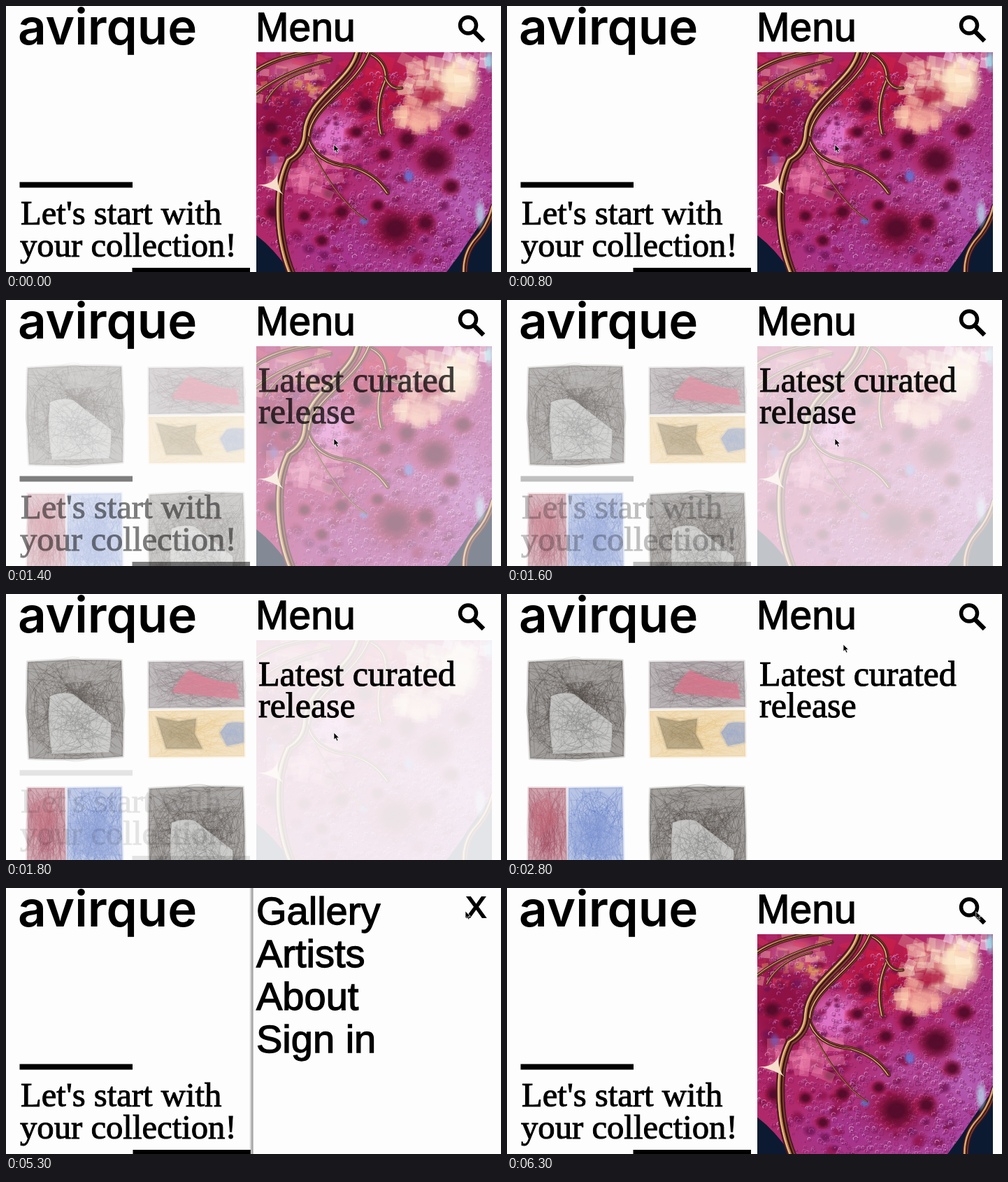
These frames come from a looping animation (708x380 px, 6.5 s). An HTML page with a canvas:

```html
<!DOCTYPE html>
<html lang="en">
<head>
<meta charset="utf-8">
<title>Collection</title>
<style>
  html, body { margin: 0; width: 100%; height: 100%; overflow: hidden; background: #fdfdfd; }
  canvas, svg { position: absolute; left: 0; top: 0; }
  .brand { font: 600 71px Inter, sans-serif; }
  .sans { font: 56px "Liberation Sans", Arial, sans-serif; stroke: #000; stroke-width: 1.3; }
  .serif { font: 48.7px "Liberation Serif", serif; stroke: #000; stroke-width: 1; }
</style>
</head>
<body>
<canvas id="sketches" width="708" height="380"></canvas>
<canvas id="artwork" width="708" height="380"></canvas>
<svg width="708" height="380" viewBox="0 0 708 380">
  <defs>
    <linearGradient id="shade">
      <stop offset="0" stop-color="#777" stop-opacity="0"/>
      <stop offset=".7" stop-color="#777" stop-opacity=".7"/>
      <stop offset="1" stop-color="#ddd"/>
    </linearGradient>
  </defs>
  <text class="brand" x="17" y="55">avirque</text>
  <text class="sans" x="357" y="49.5" style="font-size:57px">Menu</text>
  <g fill="none" stroke="#000">
    <circle cx="661" cy="27.5" r="11.5" stroke-width="5.5"/>
    <path d="M669 36L683 50" stroke-width="6.5"/>
  </g>
  <g id="intro">
    <rect x="19.5" y="251.5" width="161.5" height="8"/>
    <text class="serif" x="21" y="312">Let's start with</text>
    <text class="serif" x="20" y="358">your collection!</text>
    <rect id="lowerBar" x="180.5" y="374" width="168.5" height="6"/>
  </g>
  <g id="release" class="serif" style="font-size:50px">
    <text x="361" y="131">Latest curated</text>
    <text x="361" y="176">release</text>
  </g>
  <g id="menu">
    <rect x="348" width="6" height="380" fill="url(#shade)"/>
    <rect x="354" width="354" height="380" fill="#fdfdfd"/>
    <g class="sans">
      <text x="358" y="51.5">Gallery</text>
      <text x="358" y="112.5">Artists</text>
      <text x="358" y="173.5">About</text>
      <text x="358" y="234.5">Sign in</text>
      <text x="658" y="42" style="font-size:43px;stroke-width:2">X</text>
    </g>
  </g>
  <path id="cursor" d="M0 0V10L2.4 8L4.2 12L6 11.2L4.3 7.4H7.4Z" stroke="#fff" stroke-width=".7"/>
</svg>
<script>
const $ = id => document.getElementById(id);
const TAU = Math.PI * 2, LOOP = 6500;

let seed = 11;
function random() {
  seed = (seed * 1664525 + 1013904223) >>> 0;
  return seed / 4294967296;
}
const between = (a, b) => a + (b - a) * random();
const pick = list => list[Math.floor(random() * list.length)];

// Fill an outline softly, then hatch it with loose looping strokes.
function scribble(c, outline, color, density, wash = .3) {
  const shape = new Path2D(outline);
  const [x0, y0, x1, y1] = outline.match(/\d+/g).map(Number).reduce(
    (box, v, i) => i % 2 ? [box[0], Math.min(box[1], v), box[2], Math.max(box[3], v)]
                         : [Math.min(box[0], v), box[1], Math.max(box[2], v), box[3]],
    [999, 999, 0, 0]);
  c.fillStyle = c.strokeStyle = color;
  c.globalAlpha = wash;
  c.fill(shape);
  c.save();
  c.lineWidth = 4;
  c.lineJoin = "round";
  c.globalAlpha = wash / 3;
  c.stroke(shape);
  c.clip(shape);
  c.lineWidth = .6;
  c.globalAlpha = .42;
  const x = () => between(x0 - 4, x1 + 4), y = () => between(y0 - 4, y1 + 4);
  for (let i = 0; i < density; i++) {
    c.beginPath();
    c.moveTo(x(), y());
    c.bezierCurveTo(x(), y(), x(), y(), x(), y());
    c.stroke();
  }
  c.restore();
  c.globalAlpha = .25;
  c.lineWidth = .6;
  for (let i = 0; i < density / 12; i++) {
    c.beginPath();
    c.ellipse((x0 + x1) / 2 + between(-3, 3), (y0 + y1) / 2 + between(-3, 3),
      (x1 - x0) * between(.4, .5), (y1 - y0) * between(.4, .5), 0, between(0, TAU), between(0, TAU));
    c.stroke();
  }
  c.globalAlpha = 1;
}

function darkSketch(c, dx, dy) {
  const patch = "M63 146Q80 139 96 143L150 185Q151 210 147 226L66 228Q58 185 63 146Z";
  c.save();
  c.translate(dx, dy);
  scribble(c, "M31 97Q98 92 165 95Q169 165 167 232Q100 238 33 235Q28 160 31 97Z", "#49433e", 230, .5);
  c.fillStyle = "#d8d8d6";
  c.globalAlpha = .9;
  c.fill(new Path2D(patch));
  scribble(c, patch, "#777775", 75, .1);
  scribble(c, "M92 104L141 100L148 122L84 127Z", "#aaa7a4", 40, .35);
  c.restore();
}

function drawSketches() {
  const c = $("sketches").getContext("2d");
  darkSketch(c, 0, 0);
  scribble(c, "M204 97L339 96L341 161L204 163Z", "#786c73", 120, .5);
  scribble(c, "M238 140Q248 122 262 109Q290 125 329 128L333 150Z", "#d9778c", 50, .75);
  scribble(c, "M204 167L340 166L341 232L205 233Z", "#e6c07c", 90, .5);
  scribble(c, "M215 176L247 182L272 178L270 200L281 221L229 221Z", "#98896a", 45, .6);
  scribble(c, "M340 184Q325 182 316 185L306 198L316 217L340 212Z", "#9ba9cb", 40, .7);
  scribble(c, "M31 277L84 277L86 400L30 400Z", "#a04c60", 130, .5);
  scribble(c, "M37 300L60 292L72 325L40 350Z", "#c26b7b", 30, .4);
  scribble(c, "M88 277L165 276L167 400L87 400Z", "#5876c2", 140, .42);
  scribble(c, "M95 325L130 312L160 335L158 374L98 370Z", "#92a4d8", 40, .4);
  darkSketch(c, 174, 181);
}

function drawArtwork() {
  const c = $("artwork").getContext("2d");

  function blob(x, y, rx, ry, color, alpha = 1, core = .35) {
    c.save();
    c.translate(x, y);
    c.scale(rx, ry);
    const glow = c.createRadialGradient(0, 0, 0, 0, 0, 1);
    glow.addColorStop(0, color);
    glow.addColorStop(core, color);
    glow.addColorStop(1, color + "00");
    c.globalAlpha = alpha;
    c.fillStyle = glow;
    c.fillRect(-1, -1, 2, 2);
    c.restore();
  }

  function branch(d, width) {
    const path = new Path2D(d);
    c.lineCap = "round";
    [["#4a1628", 1.25, 0], ["#7d4128", .9, 0], ["#c08a50", .35, -.2], ["#f6d9a4", .12, -.3], ["#3a1418", .25, .15]]
      .forEach(([color, scale, shift]) => {
        c.save();
        c.translate(width * shift, 0);
        c.strokeStyle = color;
        c.lineWidth = width * scale;
        c.stroke(path);
        c.restore();
      });
  }

  // Small tilted translucent tiles scattered over an area
  function facets(count, x0, y0, x1, y1, size, colors, alpha) {
    for (let i = 0; i < count; i++) {
      c.save();
      c.translate(between(x0, x1), between(y0, y1));
      c.rotate(between(-.2, .5));
      c.globalAlpha = alpha * between(.4, 1);
      c.fillStyle = pick(colors);
      const w = size * between(.5, 1.3), h = size * between(.4, 1);
      c.fillRect(-w / 2, -h / 2, w, h);
      c.restore();
    }
  }

  c.beginPath();
  c.rect(358, 66, 337, 314);
  c.clip();
  c.fillStyle = "#0c1a31";
  c.fillRect(358, 66, 337, 314);

  c.save();
  c.clip(new Path2D("M340 50H720V260Q690 292 664 332Q645 362 622 390H412Q385 345 350 322Z"));
  const base = c.createLinearGradient(358, 80, 680, 350);
  base.addColorStop(0, "#a81d58");
  base.addColorStop(.45, "#b02a6c");
  base.addColorStop(1, "#a846a4");
  c.fillStyle = base;
  c.fillRect(358, 66, 337, 314);

  blob(395, 175, 60, 85, "#870d3c", .8);
  blob(540, 120, 85, 70, "#b8143e", .9);
  blob(470, 185, 50, 42, "#e47bd0", .9);
  blob(590, 265, 80, 50, "#b54a9c", .7);
  blob(480, 350, 90, 50, "#a4348c", .8);
  blob(560, 320, 65, 50, "#8f1950", .8);
  blob(655, 260, 45, 70, "#b866bc", .7);
  blob(410, 95, 45, 28, "#d97892", .8);
  facets(45, 358, 66, 460, 140, 15, ["#f3b7a4", "#7a1335", "#d8a05c", "#b03a8c", "#e03c58"], .6);
  facets(35, 480, 75, 620, 185, 22, ["#e02444", "#8b0e30", "#d8456a"], .4);

  // Deep pores among fine glassy bubbles
  for (let i = 0; i < 110; i++) {
    const r = between(4, 11);
    blob(between(358, 640), between(110, 380), r * 1.2, r, pick(["#7a0f3c", "#8f1248", "#6d1250"]), .75);
  }
  const tones = ["#ec9fd8", "#d566b8", "#f3c4ea", "#c23d86", "#cf83d6"];
  for (let i = 0; i < 2300; i++) {
    const x = 358 + 337 * Math.pow(random(), .75), y = between(95, 380), r = between(.7, 3.4);
    c.lineWidth = 1.1;
    c.globalAlpha = .4;
    c.strokeStyle = "#741758";
    c.beginPath();
    c.arc(x + .8, y + .8, r, 0, TAU);
    c.stroke();
    c.globalAlpha = between(.25, .7);
    c.strokeStyle = c.fillStyle = pick(tones);
    c.beginPath();
    c.arc(x, y, r, Math.PI * .8, Math.PI * 1.9);
    r < 1.4 ? c.fill() : c.stroke();
  }
  c.globalAlpha = 1;

  [[612, 220, 32], [652, 178, 18], [555, 318, 34], [605, 128, 22], [512, 142, 18], [572, 190, 18],
   [377, 174, 18], [398, 193, 13], [478, 294, 15], [425, 300, 13], [635, 258, 16], [540, 212, 15],
   [500, 180, 13], [460, 268, 12], [598, 310, 18], [530, 285, 13], [380, 295, 16], [450, 335, 13]]
    .forEach(([x, y, r]) => {
      blob(x, y, r * 1.2, r * 1.05, "#ac1444", .7, .4);
      blob(x + 2, y, r * .9, r * .8, "#4d0a28", .9, .35);
    });

  // Glossy reflections
  blob(625, 118, 60, 50, "#eea591", .7, .3);
  blob(648, 105, 34, 42, "#fbe6c2", .9, .5);
  blob(588, 160, 42, 20, "#f6b09c", .8, .5);
  blob(605, 128, 27, 15, "#b01c44", .9, .4);
  facets(40, 570, 78, 668, 145, 20, ["#fbe3c0", "#f6b8a0", "#fff4de"], .5);
  facets(16, 556, 148, 615, 178, 18, ["#f8b4a0", "#fbd6b4"], .5);
  facets(10, 628, 68, 690, 84, 16, ["#fdf3e6", "#f3c8e4"], .7);
  blob(607, 129, 22, 12, "#b01c44", .8, .4);
  facets(18, 380, 212, 475, 272, 27, ["#f58cb4"], .4);
  blob(576, 243, 9, 11, "#5b78d8", .8);
  blob(512, 307, 8, 7, "#507cd0", .7);
  blob(383, 218, 8, 12, "#6b5fc0", .6);
  c.restore();

  blob(691, 78, 8, 20, "#94dce8", .8);
  blob(678, 297, 9, 24, "#b9e4f2", .7);

  branch("M358 92Q390 70 450 64", 6);
  branch("M358 125Q400 92 465 77", 4);
  branch("M436 92Q390 102 372 137", 3);
  branch("M516 66Q545 77 544 105Q527 143 537 182", 5);
  branch("M543 102Q550 120 566 117", 4);
  branch("M442 215Q478 282 515 305", 2);
  branch("M697 286Q690 315 670 336Q655 355 656 382", 7);
  branch("M432 187Q442 225 492 229Q528 239 546 267", 5);
  branch("M504 66C493 110 432 132 429 181Q428 207 405 220Q390 250 391 292Q391 340 408 382", 10);
  branch("M520 66C500 118 437 142 434 185", 5);
  c.fillStyle = "#f5dfca";
  c.fill(new Path2D("M360 255Q383 257 389 238Q386 258 397 270Q386 261 360 255Z"));
}

const clamp = v => Math.min(1, Math.max(0, v));

// Cubic easing with control points (.25,.1) and (.25,1)
function ease(progress) {
  const x = clamp(progress);
  let low = 0, high = 1;
  const curve = (s, a, b) => 3 * a * s * (1 - s) ** 2 + 3 * b * s * s * (1 - s) + s ** 3;
  for (let i = 0; i < 20; i++) {
    const mid = (low + high) / 2;
    curve(mid, .25, .25) < x ? low = mid : high = mid;
  }
  return curve(low, .1, 1);
}

const cursorPath = [[0, 469, 198], [2300, 469, 198], [2800, 481, 72], [3100, 497, 43],
  [4250, 497, 43], [4900, 605, 37], [5300, 657, 33], [5700, 670, 33], [LOOP, 671, 34]];

function cursorAt(t) {
  const i = cursorPath.findIndex(point => point[0] > t);
  const [t0, x0, y0] = cursorPath[i - 1], [t1, x1, y1] = cursorPath[i];
  const k = (t - t0) / (t1 - t0);
  return [x0 + (x1 - x0) * k, y0 + (y1 - y0) * k];
}

function render(t) {
  const reveal = t < 2850 ? ease((t - 1050) / 1200) : 1 - ease((t - 2850) / 650);
  const open = ease((t - 2850) / 400) - ease((t - 5950) / 350);
  $("artwork").style.opacity = $("intro").style.opacity = 1 - reveal;
  $("sketches").style.opacity = reveal;
  $("release").style.opacity = 1 - (1 - reveal) ** 2;
  $("menu").setAttribute("transform", `translate(${(1 - open) * 365})`);
  $("lowerBar").setAttribute("transform", `translate(${open > .5 ? 1 : 0})`);
  $("cursor").setAttribute("transform", `translate(${cursorAt(t)})`);
}

drawSketches();
drawArtwork();
const start = performance.now();
function tick() {
  const elapsed = (performance.now() - start) % LOOP;
  render(Math.floor(elapsed / 100) * 100);
  requestAnimationFrame(tick);
}
tick();
</script>
</body>
</html>
```
